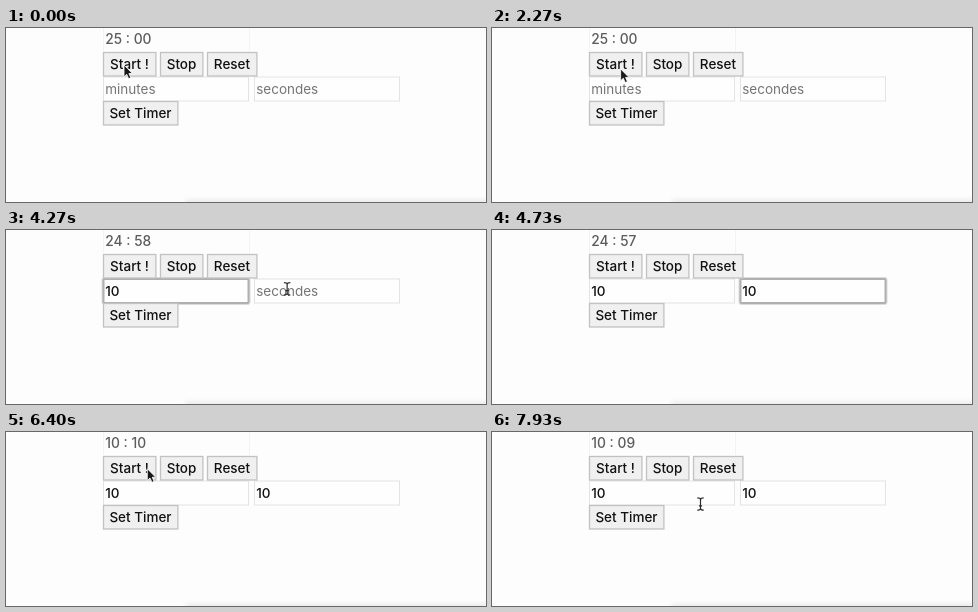
An HTML page for the animation above (8000 ms loop, 480 by 174 pixels).

```html
<!DOCTYPE html>
<html lang="en">
<head>
<meta charset="utf-8">
<title>Timer</title>
<style>
html, body { margin: 0; width: 100%; height: 100%; overflow: hidden; background: #fefdfe; }
svg { display: block; width: 100%; height: 100%; }
text { font: 500 13.5px Inter, Roboto, sans-serif; fill: #111; white-space: pre; }
.btn rect { fill: #f0f0f0; stroke: #c2c2c2; stroke-width: 1.3; }
.btn.down rect { fill: #dedede; stroke: #a2a2a2; }
.field .box { fill: #fefefe; stroke: #e3e3e5; }
.field .ring, .field .glow { fill: none; visibility: hidden; }
.field .ring { stroke: #b0b0b0; stroke-width: 2; }
.field .glow { stroke: #dcdcdc; stroke-width: 4; }
.field.focus .ring, .field.focus .glow { visibility: visible; }
.field.empty text { fill: #757575; font-weight: 400; }
#clock { fill: #5c5c5c; font-size: 13.8px; }
#shade { fill: #e8e8e8; filter: blur(2.5px); }
</style>
</head>
<body>
<svg viewBox="0 0 480 174">
  <path d="M97.5 0V23M243.5 0V23" stroke="#f3f3f5"/>
  <rect id="shade" x="180" y="172" width="320" height="12"/>
  <text id="clock" x="99.3" y="16.4"></text>
  <g id="form"></g>
  <g id="mouse">
    <path id="arrow" d="M0 0V11.8L2.7 9.3L4.6 13.6L6.8 12.7L4.9 8.5H8.4Z" fill="#181818" stroke="#fff" stroke-width=".8"/>
    <path id="beam" d="M-3.2-6.2Q0-6.2 0-4.3Q0-6.2 3.2-6.2M0-4.5V4.5M-3.2 6.2Q0 6.2 0 4.3Q0 6.2 3.2 6.2M-1.6 1.8H1.6" fill="none" stroke="#2c2c2c" stroke-width="1.2"/>
  </g>
</svg>
<script>
const LOOP = 8000, FPS = 15;
const $ = id => document.getElementById(id);
const form = $('form');

function add(parent, tag, attrs, label = '') {
  const el = document.createElementNS('http://www.w3.org/2000/svg', tag);
  for (const name in attrs) el.setAttribute(name, attrs[name]);
  el.textContent = label;
  return parent.appendChild(el);
}

function button(x, y, width, label) {
  const g = add(form, 'g', { class: 'btn' });
  add(g, 'rect', { x: x + .5, y: y + .5, width: width - .6, height: 23.5 });
  add(g, 'text', { x: x + width / 2, y: y + 16.8, 'text-anchor': 'middle' }, label);
  return down => g.classList.toggle('down', down);
}

function field(x, hint) {
  const g = add(form, 'g', { class: 'field' });
  const box = { x: x + .5, y: 49, width: 145, height: 24 };
  add(g, 'rect', { ...box, class: 'glow', rx: 1 });
  add(g, 'rect', { ...box, class: 'box' });
  add(g, 'rect', { ...box, class: 'ring', rx: 1 });
  const text = add(g, 'text', { x: x + 2.2, y: 66 });
  return (value, focused) => {
    text.textContent = value || hint;
    g.classList.toggle('empty', !value);
    g.classList.toggle('focus', focused);
  };
}

const minutes = field(97, 'minutes');
const seconds = field(248, 'secondes');
const start = button(97, 24, 53, 'Start !');
button(154, 24, 43, 'Stop');
button(201, 24, 50, 'Reset');
const setTimer = button(97, 73, 75, 'Set Timer');

// Times below are ticks of 1/15 s.
const SET = 87;
const smooth = u => u * u * (3 - 2 * u);
const speedUp = u => u ** 2.4;

// Each mouse move follows a cubic curve through four control points.
const moves = [
  { from: 33, to: 45, ease: smooth, curve: [[118, 37], [300, 105], [380, 75], [202, 66]] },
  { from: 56, to: 65, ease: speedUp, curve: [[202, 66], [237, 66], [272, 53], [307, 62]] },
  { from: 77, to: 85, ease: smooth, curve: [[307, 62], [250, 78], [190, 84], [147.5, 82.5]] },
  { from: 89, to: 94, ease: smooth, curve: [[147.5, 82.5], [147, 70], [143, 50], [141.3, 36.7]] },
  { from: 107, to: 119, ease: smooth, curve: [[141.3, 36.7], [200, 130], [325, 105], [208.5, 72]] }
];

const within = (k, from, to) => k >= from && k < to;
const clamp = (v, low, high) => Math.min(high, Math.max(low, v));
const typed = (k, from, pace) => '10'.slice(0, clamp(Math.floor((k - from) / pace) + 1, 0, 2));

function bezier([a, b, c, d], t) {
  const s = 1 - t;
  return [0, 1].map(i =>
    s ** 3 * a[i] + 3 * s * s * t * b[i] + 3 * s * t * t * c[i] + t ** 3 * d[i]);
}

function position(k) {
  const { from, to, ease, curve } = moves.findLast(m => k >= m.from) || moves[0];
  return bezier(curve, ease(clamp((k - from) / (to - from), 0, 1)));
}

function timeLeft(k) {
  const [total, begin] = k < SET ? [25 * 60, 23] : [10 * 60 + 10, 93];
  const left = total - Math.max(0, Math.floor((k - begin) / FPS));
  const pad = n => String(n).padStart(2, '0');
  return `${pad(Math.floor(left / 60))} : ${pad(left % 60)}`;
}

function draw(ms) {
  const k = Math.floor(ms * FPS / 1000 + .06) % (LOOP * FPS / 1000);
  $('clock').textContent = timeLeft(k);
  minutes(typed(k, 51, 1), within(k, 46, 65));
  seconds(typed(k, 69, 2), within(k, 65, SET - 1));
  start(within(k, 6, 8) || k === 95);
  setTimer(k === SET - 1);

  const [x, y] = position(k);
  const overField = within(y, 49, 73) && (within(x, 97, 243) || within(x, 248, 394));
  const typing = within(k, 51, 57) || within(k, 69, 78);
  $('mouse').setAttribute('transform', `translate(${x} ${y})`);
  $('arrow').style.display = overField || typing ? 'none' : '';
  $('beam').style.display = overField && !typing ? '' : 'none';
}

const origin = performance.now();
function loop() {
  draw((performance.now() - origin) % LOOP);
  requestAnimationFrame(loop);
}
loop();
</script>
</body>
</html>
```
